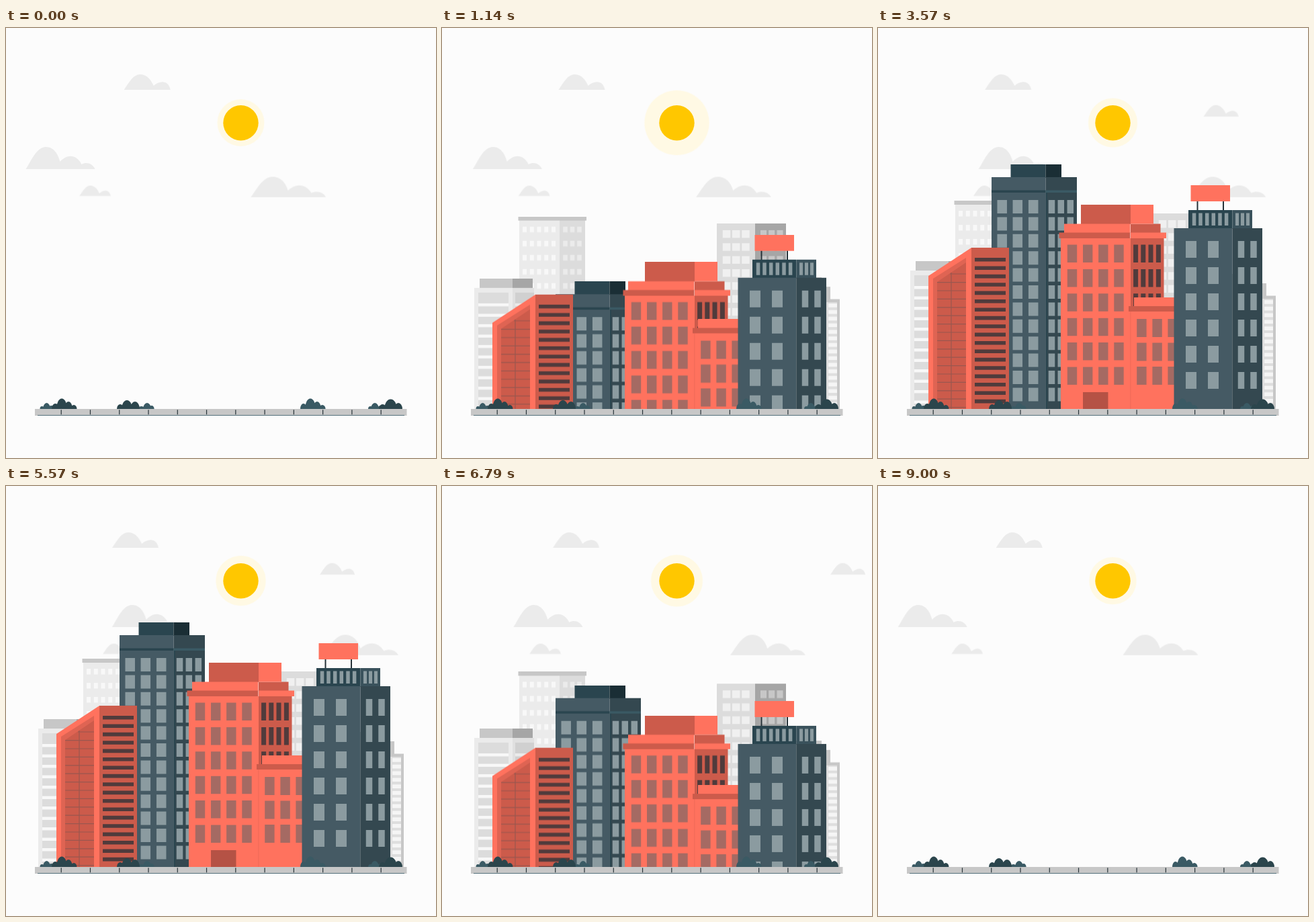
An HTML page without scripts that plays this animation: 640 by 640 pixels, repeating every 9210 ms.

```html
<!DOCTYPE html>
<html lang="en">
<head>
<meta charset="utf-8">
<title>City rising</title>
<style>
html, body { margin: 0; width: 100%; height: 100%; overflow: hidden; background: #fcfcfc; }
svg { display: block; width: 100vw; height: 100vh; }

.red { fill: #ff725e; }
.brick { fill: #cc5b4b; }
.slate { fill: #455a64; }
.deep { fill: #344850; }
.ink { fill: #2a454f; }
.g1 { fill: #ebebeb; }
.g2 { fill: #dcdcdc; }
.g3 { fill: #c7c7c7; }
.g4 { fill: #a6a6a6; }

/* Windows are dashed strokes: one dash per floor. */
.win { fill: none; }
.glass { stroke: #8b9ba0; }
.pane { stroke: #a56a63; }
.dark { stroke: #503b3c; }
.white { stroke: #f8f8f8; }

.cloud { fill: #ebebeb; animation: drift 9210ms ease-in-out infinite; }
@keyframes drift {
  0%, 98.9%, 100% { transform: none; }
  51.7% { transform: translateX(var(--d)); }
}

.halo {
  fill: #fff9e4; transform-origin: 349.5px 141px;
  animation: pulse 1535ms cubic-bezier(.76, 0, .24, 1) infinite alternate;
}
@keyframes pulse { from { transform: scale(.714); } to { transform: none; } }

/* --h: drop that hides the whole building below the street.
   Buildings rise with an ease-out and fall with an ease-in. */
.b {
  --down: translateY(var(--h));
  animation: 9210ms cubic-bezier(.333, 1, .667, 1) infinite;
}

#edge { animation-name: edge; }
#pale { animation-name: pale; }
#tower { animation-name: tower; }
#low { animation-name: low; }
#annex { animation-name: annex; }
#sign { animation-name: sign; }
#slant { animation-name: slant; }
#hall { animation-name: hall; }
#high { animation-name: high; }

@keyframes edge {
  0%, .81%, 85.34%, 100% { transform: var(--down); }
  17.1% { transform: none; }
  66.23% { transform: none; animation-timing-function: cubic-bezier(.333, 0, .667, 0); }
}
@keyframes pale {
  0%, 2.08%, 85.34%, 100% { transform: var(--down); }
  18.37% { transform: none; }
  66.23% { transform: none; animation-timing-function: cubic-bezier(.333, 0, .667, 0); }
}
@keyframes tower {
  0%, 2.93%, 85.34%, 100% { transform: var(--down); }
  19.22% { transform: none; }
  66.23% { transform: none; animation-timing-function: cubic-bezier(.333, 0, .667, 0); }
}
@keyframes low {
  0%, 3.95%, 85.34%, 100% { transform: var(--down); }
  20.24% { transform: none; }
  66.23% { transform: none; animation-timing-function: cubic-bezier(.333, 0, .667, 0); }
}
@keyframes annex {
  0%, 4.5%, 85.34%, 100% { transform: var(--down); }
  22.8% { transform: none; }
  60.8% { transform: none; animation-timing-function: cubic-bezier(.333, 0, .667, .264); }
}
@keyframes sign {
  0%, 4.83%, 85.34%, 100% { transform: var(--down); }
  23.68% { transform: none; }
  60.8% { transform: none; animation-timing-function: cubic-bezier(.333, 0, .667, .264); }
}
@keyframes slant {
  0%, 6.08%, 85.34%, 100% { transform: var(--down); }
  24.28% { transform: none; }
  60.8% { transform: none; animation-timing-function: cubic-bezier(.333, 0, .667, .264); }
}
@keyframes hall {
  0%, 3.52%, 85.34%, 100% { transform: var(--down); }
  28.72% { transform: none; }
  60.8% { transform: none; animation-timing-function: cubic-bezier(.333, 0, .667, .264); }
}
@keyframes high {
  0%, 7.86%, 85.34%, 100% { transform: var(--down); }
  28.01% { transform: none; }
  60.8% { transform: none; animation-timing-function: cubic-bezier(.333, 0, .667, .264); }
}
</style>
</head>
<body>
<svg viewBox="0 0 640 640" xmlns="http://www.w3.org/2000/svg">
  <defs>
    <path id="cloud2" d="M0 23C8 11 14 0 24 0C35 0 41 10 44 17C53 9 66 8 69 23Z"/>
    <path id="cloud3" d="M0 33C8 21 16 0 30 0C42 0 48 11 51 22C60 12 74 9 83 26C90 22 99 24 103 33Z"/>
    <clipPath id="ground"><rect width="640" height="577"/></clipPath>
  </defs>

  <circle class="halo" cx="349.5" cy="141" r="49"/>
  <circle cx="349.5" cy="141.200" r="26.200" fill="#ffc700"/>

  <g class="cloud" style="--d:-19px"><use href="#cloud2" x="175.700" y="69"/></g>
  <g class="cloud" style="--d:138px"><use href="#cloud3" x="29.500" y="177"/></g>
  <g class="cloud" style="--d:37.5px"><use href="#cloud2" transform="translate(109.3 234.6) scale(.676)"/></g>
  <g class="cloud" style="--d:116px"><use href="#cloud3" transform="translate(364.2 221.5) scale(1.088 .925)"/></g>
  <g class="cloud" style="--d:-298px"><use href="#cloud2" transform="translate(744 114.7) scale(.755)"/></g>

  <g clip-path="url(#ground)">
    <g id="tower" class="b" style="--h:320px">
      <path class="g1" d="M115 262h60v315h-60z"/>
      <path class="g2" d="M175 262h38v315h-38z"/>
      <path class="g3" d="M113.500 257h101.500v6h-101.500z"/>
      <path class="win white" stroke-width="6" stroke-dasharray="8.500 12.500" d="M123 272V577M133.800 272V577M144.500 272V577M155.200 272V577M166 272V577"/>
      <path class="win" stroke="#ebebeb" stroke-width="6.500" stroke-dasharray="8.500 12.500" d="M183.500 272V577M194 272V577M204.500 272V577"/>
    </g>

    <g id="low" class="b" style="--h:230px">
      <path class="g3" d="M56 347h49v15h-49z"/>
      <path class="g4" d="M105 347h30v15h-30z"/>
      <path class="g1" d="M48 361h57v216h-57z"/>
      <path fill="#e0e0e0" d="M105 361h32v216h-32z"/>
      <path class="g2" d="M54 368h45v209h-45z"/>
      <path fill="#d0d0d0" d="M109 368h28v209h-28z"/>
      <path class="win white" stroke-width="45" stroke-dasharray="4.500 11" d="M76.500 384V577"/>
      <path class="win" stroke="#ebebeb" stroke-width="28" stroke-dasharray="4.500 11" d="M123 384V577"/>
    </g>

    <g id="pale" class="b" style="--h:301px">
      <path class="g2" d="M409 276h57v301h-57z"/>
      <path class="g4" d="M466 276h46v301h-46z"/>
      <path class="win" stroke="#f0f0f0" stroke-width="11.500" stroke-dasharray="11.500 7.800" d="M423.500 286V577M437.700 286V577M452 286V577"/>
      <path class="win" stroke="#c7c7c7" stroke-width="9" stroke-dasharray="11.500 7.800" d="M478.500 286V577M490.700 286V577M503 286V577"/>
    </g>

    <g id="edge" class="b" style="--h:211px">
      <path class="g3" d="M527 366H565V380H578V398.500H592V577H527Z"/>
      <path fill="#dedede" d="M572 403h16v174h-16z"/>
      <path class="win" stroke="#f5f5f5" stroke-width="13" stroke-dasharray="5.700 4.100" d="M581.500 405V577"/>
    </g>

    <g id="high" class="b" style="--h:374px">
      <path class="ink" d="M197.500 203h52v20h-52z"/>
      <path fill="#1a2e35" d="M249.500 203H273v20h-23.500z"/>
      <path class="slate" d="M169 222h80.500v355H169z"/>
      <path class="deep" d="M249.500 222H296v355h-46.500z"/>
      <path class="ink" d="M169 241.500h80.500v3.500H169zM249.500 245h2.500v332h-2.500z"/>
      <path fill="#3a5a64" d="M249.500 241.500H296v3.500h-46.500z"/>
      <path class="win glass" stroke-width="14.500" stroke-dasharray="20 5.400" d="M184.700 256V557M207.800 256V557M231.200 256V557"/>
      <path class="win glass" stroke-width="9.500" stroke-dasharray="20 5.400" d="M258.500 256V557M272.300 256V557M286.300 256V557"/>
    </g>

    <g id="slant" class="b" style="--h:250px">
      <path class="red" d="M75 369L139 327H195V577H75Z"/>
      <path class="brick" d="M139 327h56v250h-56z"/>
      <path fill="#df6453" d="M82 373L131 342V577H82Z"/>
      <path class="brick" d="M88 378L131 349V577H88Z"/>
      <path class="win dark" stroke-width="46" stroke-dasharray="5.600 6.800" d="M167 342V560"/>
      <g class="win" stroke="#9a574f">
        <path stroke-width="43" stroke-dasharray="1.200 11.200" d="M109.500 378V577"/>
        <path stroke-width="1.200" d="M109 364V577M107 366H131"/>
      </g>
    </g>

    <g id="hall" class="b" style="--h:314px">
      <path class="brick" d="M302 263h74v29h-74zM376 291.500h44.500v13.500H376zM376 313h49.500v264H376z"/>
      <path class="red" d="M376 263h34v28.500h-34zM277 291.500h98.500v13.500H277zM272 313h104v264H272zM376 304.500h53v8.500h-53z"/>
      <path class="brick" d="M269.500 304.500h106v8.500h-106z"/>
      <path class="win pane" stroke-width="14.400" stroke-dasharray="26.500 9.900" d="M289 322.500V532M312.200 322.500V532M335.300 322.500V532M358.500 322.500V532"/>
      <path class="win dark" stroke-width="7" stroke-dasharray="26.500 9.900" d="M383.600 322.500V532M394.800 322.500V532M406 322.500V532M417.400 322.500V532"/>
      <path fill="#b55245" d="M305 542h37.500v25H305z"/>
    </g>

    <g id="annex" class="b" style="--h:176px">
      <path class="red" d="M381 401h65v13h-65zM376 422h70v155h-70z"/>
      <path class="brick" d="M373 414h73v8h-73z"/>
      <path class="win" stroke="#ea6957" stroke-width=".8" d="M375.800 422V577"/>
      <path class="win pane" stroke-width="14.400" stroke-dasharray="27 8.500" d="M392.400 433V531M415.600 433V531M438.600 433V531"/>
    </g>

    <g id="sign" class="b" style="--h:343px">
      <path class="win" stroke="#263238" stroke-width="2" d="M475.500 257V272M514 257V272"/>
      <path class="red" d="M465.500 234H524v24h-58.500z"/>
      <path class="ink" d="M462 271h65.500v28H462z"/>
      <path fill="#3a525c" d="M527.500 271H557v28h-29.500z"/>
      <path class="win glass" stroke-width="5.500" d="M470.500 275.500V294M480 275.500V294M489.700 275.500V294M499.300 275.500V294M509 275.500V294M518.600 275.500V294"/>
      <path class="win glass" stroke-width="5" d="M534.500 275.500V294M542.500 275.500V294M550.500 275.500V294"/>
      <path class="slate" d="M440.500 298h87v279h-87z"/>
      <path class="deep" d="M527.500 298H572v279h-44.500z"/>
      <path class="win glass" stroke-width="16" stroke-dasharray="25 14" d="M466 317V537M499 317V537"/>
      <path class="win glass" stroke-width="9.500" stroke-dasharray="25 14" d="M540.500 317V537M559 317V537"/>
    </g>
  </g>

  <g fill="#3a5a64">
    <path d="M50.500 567a3 4 0 0 1 6 0M55 567a5.500 9 0 0 1 11 0M63 567a4.500 5 0 0 1 9 0"/>
    <path d="M197 567a4.500 4 0 0 1 9 0M204 567a6 9 0 0 1 12 0M213 567a3.800 5 0 0 1 7.600 0"/>
    <path d="M438 567a4.800 8 0 0 1 9.600 0M445 567a8 15.500 0 0 1 16 0M457 567a6 11 0 0 1 12 0M466 567a4.800 6 0 0 1 9.600 0"/>
    <path d="M539 567a3.500 4 0 0 1 7 0M543 567a6 9 0 0 1 12 0M553 567a4.500 5 0 0 1 9 0"/>
  </g>
  <g fill="#2b454c">
    <path d="M68 567a5.500 8 0 0 1 11 0M75 567a8 15.500 0 0 1 16 0M87 567a6 11 0 0 1 12 0M96.500 567a4.500 6 0 0 1 9 0"/>
    <path d="M165 567a5 7 0 0 1 10 0M172 567a8 13 0 0 1 16 0M185 567a7 11 0 0 1 14 0"/>
    <path d="M555 567a5.500 7 0 0 1 11 0M563 567a9.500 14.500 0 0 1 19 0M578 567a6 9 0 0 1 12 0"/>
  </g>

  <path class="g3" d="M43 567H596.500V577H43Z"/>
  <path class="win" stroke="#54707a" d="M47 576.500H593"/>
  <path class="win" stroke="#263238" stroke-width="7" stroke-dasharray="1.200 42.070" d="M81.600 571.800H559"/>
</svg>
</body>
</html>
```
